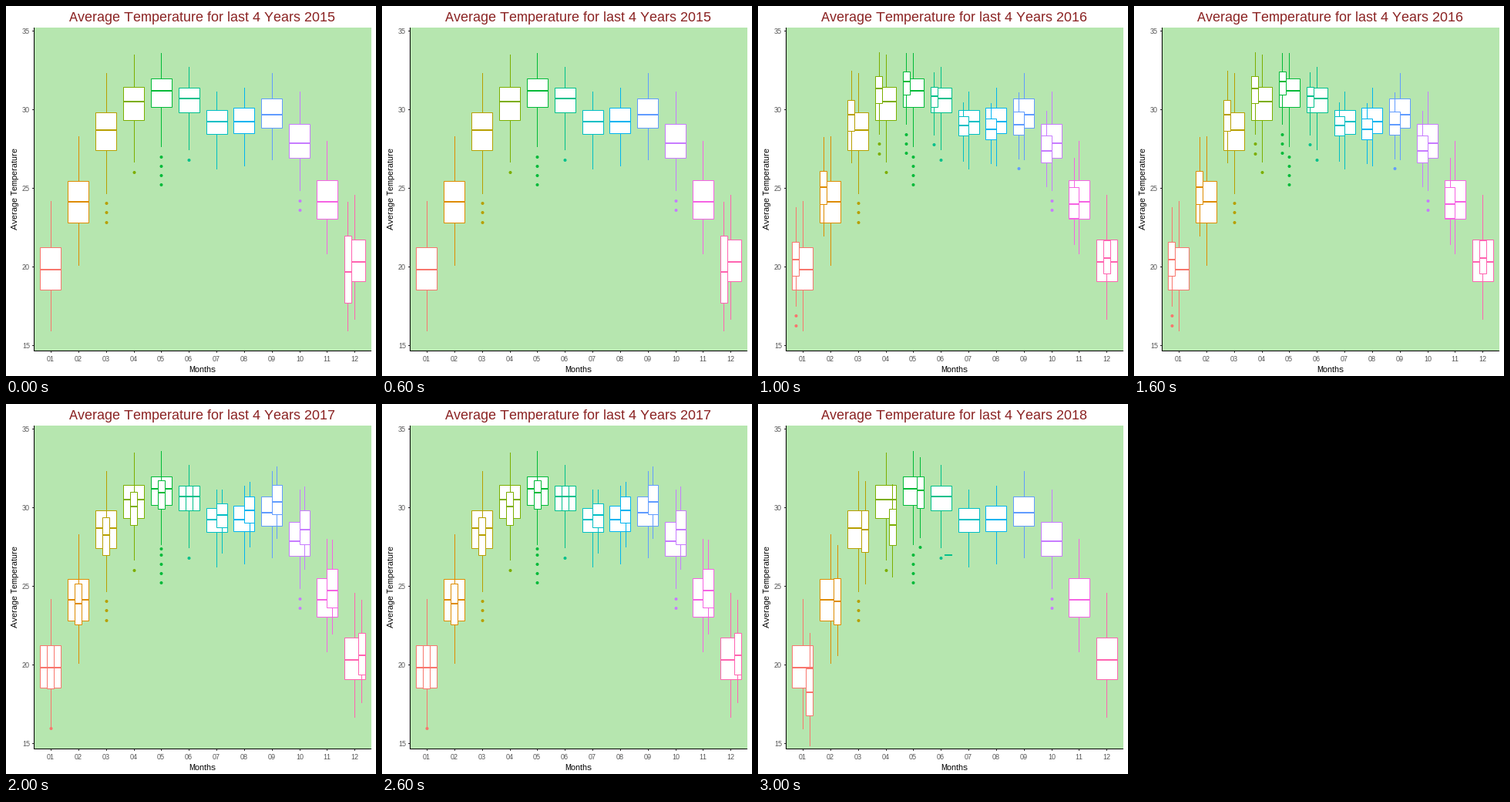
Recreate the animation shown at these times as a matplotlib script. Size 480 by 480 pixels, loop 4000 ms.

```python
from math import cos, floor, pi

import matplotlib.pyplot as plt
from matplotlib.animation import FuncAnimation
from matplotlib.patches import Circle, Rectangle

SIZE, DPI = 480, 96
PX = 72 / DPI
FIRST_X, PITCH, HALF = 58.45, 35.85, 13.46
DEGREE = 20.4  # pixels per degree
COLORS = ["#F8766D", "#DE8C00", "#B79F00", "#7CAE00", "#00BA38", "#00C08B",
          "#00BFC4", "#00B4F0", "#619CFF", "#C77CFF", "#F564E3", "#FF64B0"]

# How much warmer each year was than usual, by season angle
ANOMALY = {
    2015: lambda a: -0.6,
    2016: lambda a: 0.2 + 0.8 * cos(a - 1),
    2017: lambda a: 0.15 - 0.6 * cos(a - 1.3),
    2018: lambda a: -0.6 - cos(4 * a),
}
SPREAD = {2015: 1.6, 2016: 0.8, 2017: 1, 2018: 1.1}
MONTHS = {2015: [11], 2016: range(12), 2017: range(12), 2018: range(5)}
LAST_READING = (5, 27.0)  # the record stops early in June 2018

# Number of cold outliers by month
USUAL_OUTLIERS = {2: 3, 3: 1, 4: 4, 5: 1, 9: 2}
OUTLIERS = {2015: {}, 2016: {0: 2, 3: 2, 4: 3, 5: 1, 8: 1},
            2017: {0: 1, 4: 1}, 2018: {4: 1}}

plt.rcParams.update({
    "font.family": "Liberation Sans",
    "path.snap": False,
    "text.hinting": "native",
    "text.hinting_factor": 1,
    "text.kerning_factor": 6,
})
fig = plt.figure(figsize=(SIZE / DPI, SIZE / DPI), dpi=DPI, facecolor="white")
ax = fig.add_axes([0, 0, 1, 1])
ax.set(xlim=(0, SIZE), ylim=(SIZE, 0))
ax.axis("off")


def line(xs, ys, color, width=1):
    return ax.plot(xs, ys, color=color, lw=width * PX, solid_capstyle="butt", zorder=2)[0]


def patch(shape):
    shape.set_zorder(2)
    return ax.add_patch(shape)


def label(x, y, text, size, color, **kw):
    kw = {"ha": "center", "va": "baseline", **kw}
    return ax.text(x, y, text, fontsize=size * PX, color=color, **kw)


def center(month):
    return FIRST_X + PITCH * month


def season(month):
    return month * pi / 6


def row(temp):
    return round(440.5 - DEGREE * (temp - 15))


def usual_median(a):
    return (27.13 - 4.8 * cos(a + 0.375) - 2.45 * cos(2 * a + 0.325)
            - 0.5 * cos(3 * a + 1.1) - 0.28 * cos(4 * a - 0.3))


def summary(month, warmer=0, spread=1, reach=1):
    """Upper whisker, Q3, median, Q1 and lower whisker in degrees."""
    a = season(month)
    median = usual_median(a) + warmer
    q3 = median + spread * (1.08 + 0.36 * cos(a + 0.4))
    q1 = median - spread * (1.05 + 0.29 * cos(a - 0.4))
    top = q3 + reach * (2.06 + 0.89 * cos(a))
    bottom = q1 - reach * (2.42 + 0.35 * cos(a - 1))
    return top, q3, median, q1, bottom


def draw_median(x, half, temp, color):
    y = row(temp)
    return line([floor(x - half), floor(x + half) + 1], [y, y], color, 2)


def draw_box(x, half, stats, outliers, color):
    top, q3, median, q1, bottom = stats
    left, right, mid = floor(x - half), floor(x + half), floor(x) + 0.5
    dots = [patch(Circle((mid, row(bottom - 0.6 * (k + 1))), 2, fc=color, lw=0))
            for k in range(outliers)]
    return dots + [
        line([mid, mid], [row(top), row(q3)], color),
        line([mid, mid], [row(q1), row(bottom)], color),
        patch(Rectangle((left + 0.5, row(q3) + 0.5), right - left, row(q1) - row(q3),
                        fc="white", ec=color, lw=PX)),
        draw_median(x, half, median, color),
    ]


def dodge(year, month):
    """Center and half width of one year's box beside its neighbours."""
    slots = 2 if 6 <= month <= 10 else 3
    slot = year - 2016 + (month == 11)
    half = HALF / slots
    return center(month) - HALF + (2 * slot + 1) * half, half


def draw_year(year):
    parts = []
    for month in MONTHS[year]:
        stats = summary(month, ANOMALY[year](season(month)), SPREAD[year], 0.75)
        parts += draw_box(*dodge(year, month), stats,
                          OUTLIERS[year].get(month, 0), COLORS[month])
    if year == 2018:
        month, temp = LAST_READING
        parts.append(draw_median(*dodge(year, month), temp, COLORS[month]))
    return parts


patch(Rectangle((37, 28), 437, 419, fc="#B6E6AF", lw=0))
line([36.5, 36.5], [28, 448], "black")
line([36, 474], [447.5, 447.5], "black")
for i in range(5):
    y = 440.5 - 102 * i
    line([34, 36], [y, y], "#333333")
    label(31, y + 3.5, str(15 + 5 * i), 9, "#4D4D4D", ha="right")
for month, color in enumerate(COLORS):
    x = floor(center(month)) + 0.5
    line([x, x], [448, 450], "#333333")
    label(x - 0.5, 461, f"{month + 1:02d}", 9, "#4D4D4D")
    draw_box(center(month), HALF, summary(month), USUAL_OUTLIERS.get(month, 0), color)
label(254.5, 475, "Months", 11, "black")
label(15, 237.5, "Average Temperature", 11, "black", rotation=90, rotation_mode="anchor")
title = label(254.5, 20, "", 18, "#8B2323")
shown = []


def update(frame):
    while shown:
        shown.pop().remove()
    year = 2015 + frame
    title.set_text(f"Average Temperature for last 4 Years {year}")
    shown.extend(draw_year(year))
    return [title, *shown]


anim = FuncAnimation(fig, update, frames=4, interval=1000, repeat=True, repeat_delay=0)
plt.show()
```
